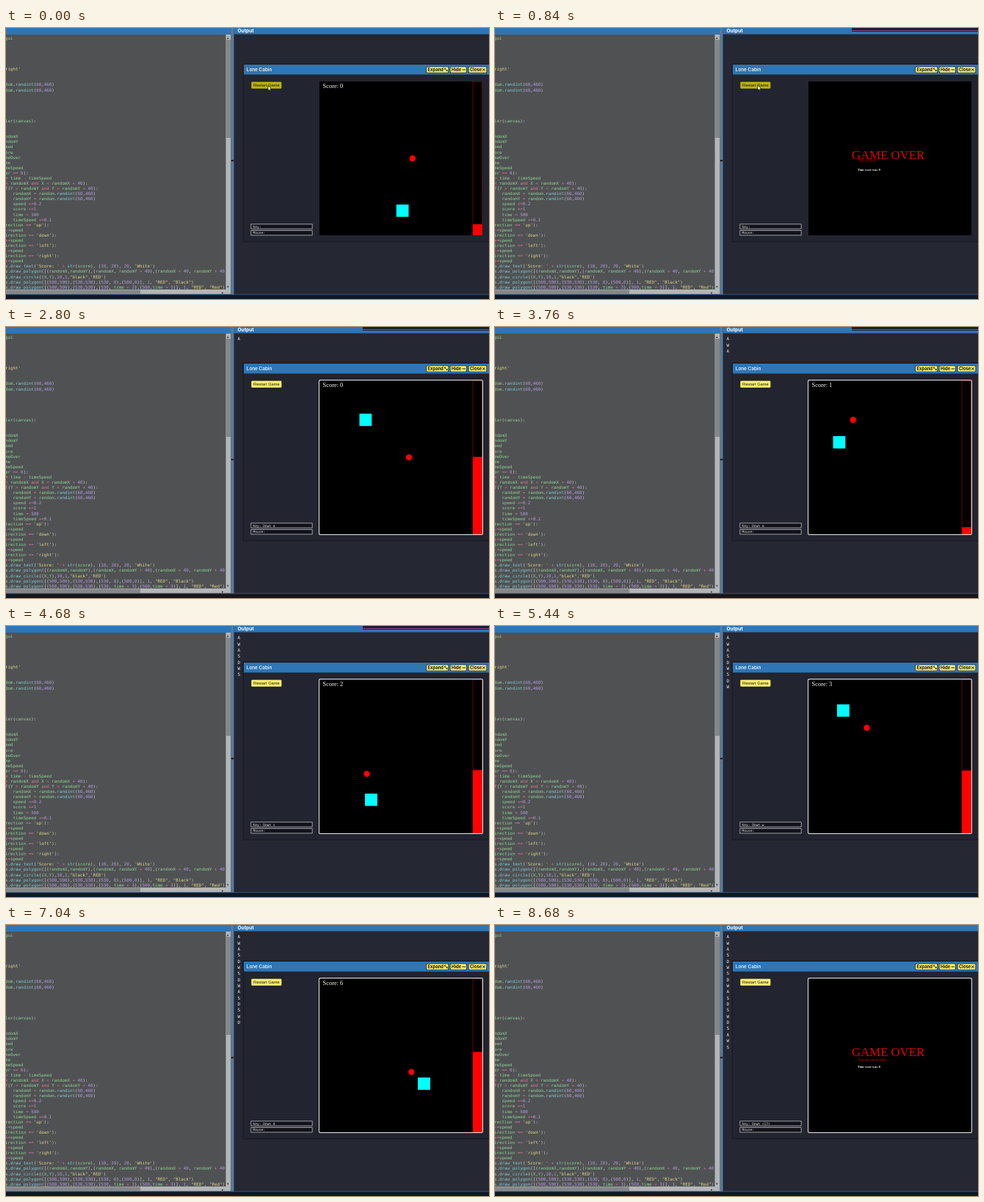
An HTML page with a canvas that plays this animation: 658x370 px, repeating every 8840 ms.

```html
<!DOCTYPE html>
<html lang="en">
<head>
<meta charset="utf-8">
<title>Game recording</title>
<style>
html, body { margin: 0; width: 100%; height: 100%; overflow: hidden; background: #252733; }
canvas { display: block; }
</style>
</head>
<body>
<canvas id="stage" width="658" height="370"></canvas>
<script>
const ctx = document.getElementById('stage').getContext('2d');
const LOOP = 8840, STEP = 40;
const MONO = '"DejaVu Sans Mono", monospace';
const SANS = 'Inter, "Liberation Sans", sans-serif';
const SERIF = '"Liberation Serif", serif';
const BLUE = '#2e76b5', YELLOW = '#fff06e';

// Game clock: ticks per ms, and the moments things happen
const RATE = 0.275, FIRST = -130, CRASH = 720, RESTART = 1885, END = 7800;
const KEYS = 'AWASDWSDWASDSWDSAWS';
const PRESS = [2390, 2840, 3284, 3896, 4289, 4429, 4507, 4860, 4942, 5572,
  5769, 6164, 6487, 6751, 7007, 7164, 7275, 7399, 7518];
const HITS = [3684, 4058, 4870, 5702, 6080, 6447];
const TARGETS = [[130, 108], [80, 181], [148, 371], [93, 81], [80, 254], [256, 285], [320, 322]];
const DIR = { W: [0, -1], A: [-1, 0], S: [0, 1], D: [1, 0] };

const CODE = {
  0: 'gui', 6: "right'", 9: 'dom.randint(60,460)', 10: 'dom.randint(60,460)',
  16: 'ler(canvas):', 19: 'ndomX', 20: 'ndomY', 21: 'eed', 22: 'ore', 23: 'meOver',
  24: 'me', 25: 'meSpeed', 26: 'er == 0):', 27: '= time - timeSpeed',
  28: '< randomX and X < randomX + 40):',
  29: 'f(Y > randomY and Y < randomY + 40):',
  30: '   randomX = random.randint(60,460)',
  31: '   randomY = random.randint(60,460)',
  32: '   speed +=0.2', 33: '   score +=1', 34: '   time = 500', 35: '   timeSpeed +=0.1',
  36: "rection == 'up'):", 37: '-=speed', 38: "irection == 'down'):", 39: '+=speed',
  40: "irection == 'left'):", 41: '-=speed', 42: "irection == 'right'):", 43: '+=speed',
  44: "s.draw_text('Score: ' + str(score), (10, 20), 20, 'White')",
  45: 's.draw_polygon([(randomX,randomY),(randomX, randomY + 40),(randomX + 40, randomY + 40',
  46: 's.draw_circle((X,Y),10,1,"black",\'RED\')',
  47: 's.draw_polygon([(500,500),(530,530),(530, 0),(500,0)], 1, "RED", "Black")',
  48: 's.draw_polygon([(500,500),(530,530),(530, time + 3),(500,time + 3)], 1, "RED", "Red")'
};
const TOKEN = /'[^']*'|"[^"]*"|[A-Za-z_]+'?|\d+(\.\d+)?|[-+=<>]+|\s+|./g;

function rect(x, y, w, h, color) {
  ctx.fillStyle = color;
  ctx.fillRect(x, y, w, h);
}

function text(str, x, y, font, color) {
  ctx.font = font;
  ctx.fillStyle = color;
  ctx.fillText(str, x, y);
}

function pill(x, y, w, h, color, r = 1) {
  ctx.fillStyle = color;
  ctx.beginPath();
  ctx.roundRect(x, y, w, h, r);
  ctx.fill();
}

function line(color, width, ...pts) {
  ctx.strokeStyle = color;
  ctx.lineWidth = width;
  ctx.beginPath();
  pts.forEach(([x, y]) => ctx.lineTo(x, y));
  ctx.stroke();
}

function tokenColor(s) {
  if (/['"]/.test(s)) return '#dcd68b';
  if (/^\d/.test(s)) return '#b69be0';
  if (/^([-+=<>]+|and|f)$/.test(s)) return '#d9789a';
  if (/^(randint|draw_\w+|str)$/.test(s)) return '#7fcbd2';
  return /^\w/.test(s) ? '#8ed196' : '#d2d6d0';
}

function drawEditor() {
  rect(0, 0, 307, 9, BLUE);
  rect(0, 9, 300, 348, '#505153');
  ctx.save();
  ctx.beginPath();
  ctx.rect(0, 9, 299, 348);
  ctx.clip();
  ctx.font = '5.85px ' + MONO;
  const advance = ctx.measureText('0').width;
  for (const row in CODE) {
    let x = -1;
    for (const token of CODE[row].match(TOKEN)) {
      ctx.fillStyle = tokenColor(token);
      ctx.fillText(token, x, 15.7 + 7.083 * row);
      x += token.length * advance;
    }
  }
  ctx.restore();

  rect(299.5, 9, 7, 348, '#b4b5b7');
  rect(300, 16, 6, 134, '#85878a');
  rect(0, 357, 306.5, 6.5, '#b4b5b7');
  rect(0, 357.5, 183, 5.5, '#85878a');
  text('▴', 301, 15, '5px "DejaVu Sans", sans-serif', '#333');
  text('▾', 301, 355, '5px "DejaVu Sans", sans-serif', '#333');
  text('▸', 294, 362.5, '5px "DejaVu Sans", sans-serif', '#333');
}

function drawOutput(t) {
  rect(306.5, 0, 4, 364, '#577b9c');
  rect(307, 180, 3, 2, '#10131c');
  rect(310.5, 0, 347.5, 8.5, BLUE);
  text('Output', 315.5, 5.8, 'bold 6.6px ' + SANS, '#fff');
  if (t >= 480 && t < 5040) {
    rect(486, 0, 172, 5, '#1c1d2c');
    rect(486, 3, 172, 1, '#8b4b91');
  }
  PRESS.forEach((at, i) => {
    if (t >= at) text(KEYS[i], 315.6, 18.2 + 8.35 * i, '5.9px ' + MONO, '#f2f2f2');
  });
}

function cornerIcon(x, y) {
  line('#111', 0.9, [x, y], [x + 3.6, y + 3.6]);
  line('#111', 0.8, [x, y + 1.6], [x, y], [x + 1.6, y]);
  line('#111', 0.8, [x + 3.6, y + 2], [x + 3.6, y + 3.6], [x + 2, y + 3.6]);
}

function field(y, str) {
  rect(333.5, y, 84, 7, '#d5d6da');
  rect(334.2, y + 0.7, 82.6, 5.6, '#11121a');
  text(str, 336.4, y + 5.1, '4.57px ' + MONO, '#f0f0f0');
}

function drawWindow(t) {
  rect(322.5, 48.5, 335.5, 244, '#1b1c26');
  rect(324, 50, 334, 241, '#22242f');
  rect(324, 50, 334, 13.5, BLUE);
  text('Lone Cabin', 327.8, 59, '500 6.4px ' + SANS, '#fff');
  [[572.5, 30.5, 'Expand'], [605, 22.5, 'Hide'], [630, 25, 'Close']].forEach(([x, w, label]) => {
    pill(x, 52.7, w, 8.6, '#15161d');
    pill(x + 0.6, 53.2, w - 1.2, 7.6, YELLOW);
    text(label, x + 2, 59, 'bold 5.9px ' + SANS, '#111');
  });
  cornerIcon(597.5, 55);
  line('#111', 1, [621.5, 57], [626, 57]);
  line('#111', 1, [649, 55.2], [652.6, 58.8]);
  line('#111', 1, [652.6, 55.2], [649, 58.8]);

  pill(333.5, 73, 42.5, 10.3, '#15161d', 1.5);
  pill(334.2, 73.6, 41.2, 9.1, t < 2120 ? '#bdb414' : YELLOW, 1.2);
  text('Restart Game', 337, 80.4, '5.75px "Liberation Sans", sans-serif', '#111');

  const n = PRESS.filter(at => t >= at).length;
  const key = t >= 8680 ? '<17>' : n ? KEYS[n - 1].toLowerCase() : '';
  field(267.5, key ? 'Key: Down ' + key : 'Key:');
  field(276.3, 'Mouse:');
}

// Distance covered since the restart; every hit speeds the ball up
function distance(t) {
  return RATE * HITS.reduce((d, at) => d + 0.2 * Math.max(0, t - at), t - RESTART);
}

function gameState(t) {
  if (t < CRASH) {
    const ticks = (t - FIRST) * RATE;
    return { x: 267 + ticks, y: 250, fill: ticks, score: 0, target: [250, 400] };
  }
  let x = 265, y = 250, from = RESTART, dir = DIR.D;
  const move = to => {
    const d = distance(to) - distance(from);
    x += dir[0] * d;
    y += dir[1] * d;
    from = to;
  };
  PRESS.forEach((at, i) => {
    if (at > t) return;
    move(at);
    dir = DIR[KEYS[i]];
  });
  move(t);
  const score = HITS.filter(at => t >= at).length;
  const since = score ? HITS[score - 1] : RESTART;
  let fill = (Math.min(t, 7040) - since) * RATE * (1 + 0.1 * score);
  if (t > 7040) fill += (t - 7040) * 0.315;
  return { x, y, fill, score, target: TARGETS[score] };
}

function drawGame(t) {
  if (t >= 2350) pill(426, 72, 224, 212, '#e8e8ea', 2);
  pill(427, 73, 222, 210, '#000', t >= 2350 ? 1.5 : 0);
  ctx.save();
  ctx.beginPath();
  ctx.rect(427, 73, 222, 210);
  ctx.clip();
  ctx.translate(427, 73);
  ctx.scale(0.419, 0.42);
  if ((t >= CRASH && t < RESTART) || t >= END) {
    text('GAME OVER', 141, 252, '40px ' + SERIF, '#e60000');
    if (t < END) text('You hit wall', 161, 262, '12px ' + SERIF, '#b80000');
    else text('You ran out of time', 160, 270, '12px ' + SERIF, '#d00000');
    text('Time score was: 0', 160, 290, 'bold 9.7px ' + SERIF, '#fff');
  } else {
    const g = gameState(t);
    text('Score: ' + g.score, 11, 22, '20px ' + SERIF, '#fff');
    rect(...g.target, 40, 40, '#0ff');
    ctx.fillStyle = '#f00';
    ctx.beginPath();
    ctx.arc(g.x, g.y, 10, 0, 7);
    ctx.fill();
    ctx.strokeStyle = '#8c0000';
    ctx.lineWidth = 2;
    ctx.strokeRect(499, 0, 30, 500);
    rect(499, 500 - g.fill, 31, g.fill, '#f00');
  }
  ctx.restore();
}

function drawCursor(t) {
  if (t >= 2360) return;
  const drift = Math.min(1, t / 1880);
  const away = Math.max(0, (t - 2000) / 360);
  ctx.save();
  ctx.translate(357 + 2 * drift + 75 * away, 78.5 - drift + 25 * away);
  ctx.beginPath();
  [[0, 0], [0, 7], [1.6, 5.6], [2.8, 8], [3.8, 7.5], [2.8, 5.2], [5, 5]]
    .forEach(([x, y]) => ctx.lineTo(x, y));
  ctx.closePath();
  ctx.fillStyle = '#fff';
  ctx.fill();
  ctx.strokeStyle = '#111';
  ctx.lineWidth = 0.8;
  ctx.stroke();
  ctx.restore();
}

function draw(t) {
  rect(0, 0, 658, 370, '#252733');
  drawEditor();
  drawOutput(t);
  drawWindow(t);
  drawGame(t);
  drawCursor(t);
  rect(0, 363.5, 658, 1, '#2c6698');
  rect(0, 364.5, 658, 5.5, '#111722');
}

const start = performance.now();
function frame() {
  const t = (performance.now() - start) % LOOP;
  draw(Math.floor(t / STEP) * STEP);
  requestAnimationFrame(frame);
}
frame();
</script>
</body>
</html>
```
